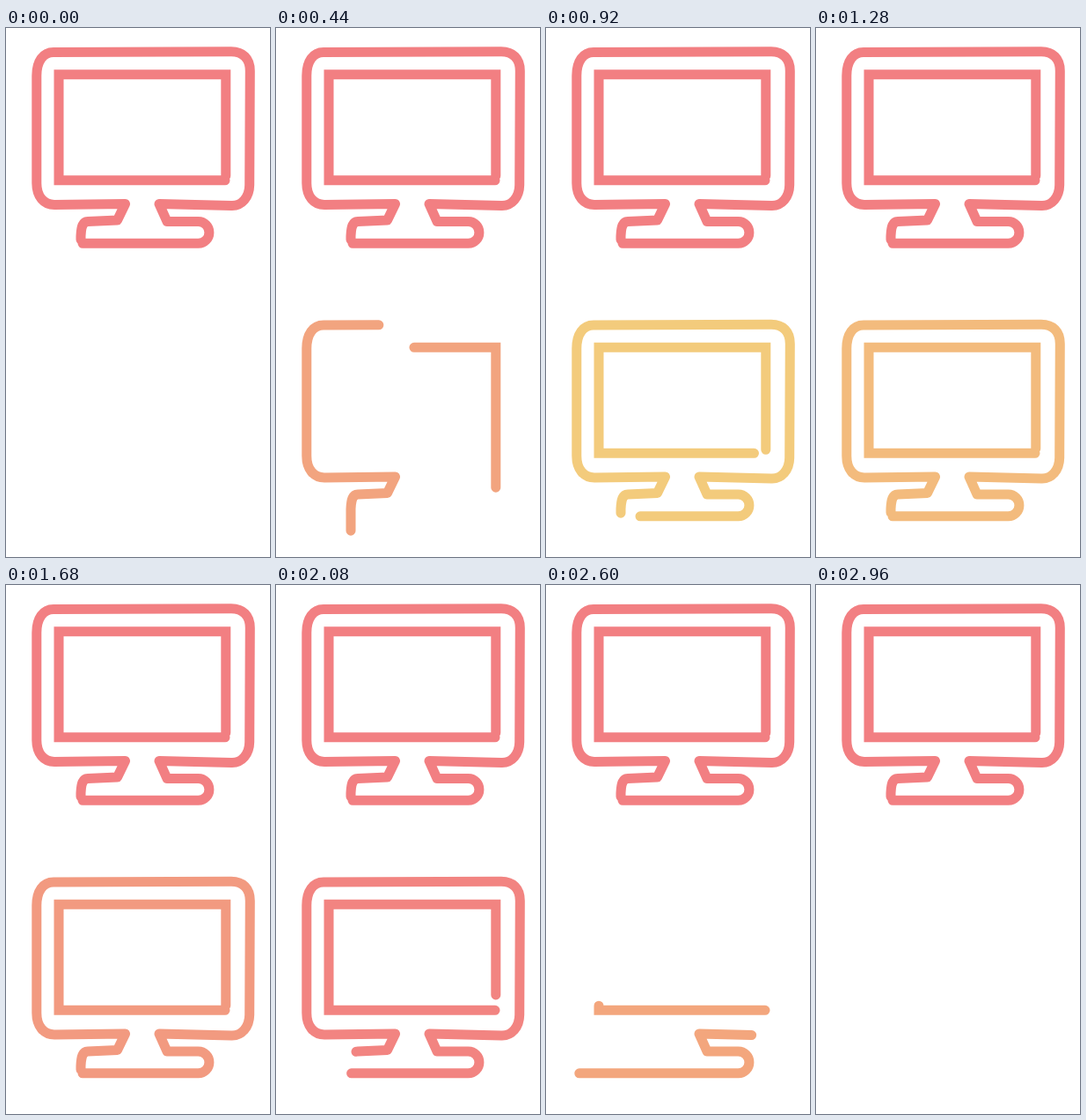
An HTML page for the animation above (3 s loop, 300 px wide and 600 px high).

```html
<!DOCTYPE html>
<html lang="en">
<head>
<meta charset="utf-8">
<title>Monitor line drawing</title>
<style>
  html, body { margin: 0; width: 100%; height: 100%; overflow: hidden; background: #fff; }
  svg { display: block; width: 300px; height: 600px; }
  path { fill: none; stroke-width: 11; stroke-linecap: round; }
  .case { stroke-linejoin: round; }
  .screen { stroke-linejoin: miter; }
</style>
</head>
<body>
<svg viewBox="0 0 300 600">
  <g id="still"></g>
  <g id="drawn" transform="translate(0 309.5)"></g>
</svg>
<script>
const LOOP = 3000, STEP = 40;
const RED = [242, 127, 130], YELLOW = [243, 210, 123], ORANGE = [244, 192, 121];

// lead: run-in before the outline starts; exit: run-out after it ends
const SHAPES = [
  {
    name: 'case', lead: 35, exit: 72,
    d: 'M85 275 V236 C85.5 225 87 219.8 93 219.5 L126.5 218 L135.5 199.5 L55 200.5 ' +
       'C43 200.5 34.8 191 34.8 176 V54 C34.8 38 42 27.5 54 27.5 L256 26.8 ' +
       'C269 27 277.4 34 277.3 49 L276.7 178 C276.5 192 268 201.5 257 201.5 ' +
       'L174 199.5 L183 219.5 H218.5 A12.4 12.4 0 0 1 218.5 244.3 H16'
  },
  {
    name: 'screen', lead: 75, exit: 0,
    d: 'M249.8 242.5 V52.8 H60 V172.8 H249'
  }
];

function addPaths(id) {
  const group = document.getElementById(id);
  return SHAPES.map(shape => {
    const el = document.createElementNS('http://www.w3.org/2000/svg', 'path');
    el.setAttribute('d', shape.d);
    el.setAttribute('class', shape.name);
    group.appendChild(el);
    return { el, lead: shape.lead, exit: shape.exit, length: el.getTotalLength() };
  });
}

const mix = (a, b, p) => a + (b - a) * p;

function ease(t, from, to) {
  const u = Math.min(1, Math.max(0, (t - from) / (to - from)));
  return u * u * (3 - 2 * u);
}

function trim(line, enter, leave) {
  const full = line.length - line.exit;
  const tail = mix(line.lead * enter, line.length, leave);
  const head = mix(full * enter, line.length, leave);
  const size = head - tail;
  line.el.style.visibility = size > 0.01 ? 'visible' : 'hidden';
  line.el.style.strokeDasharray = `${Math.max(size, 0)} 9999`;
  line.el.style.strokeDashoffset = -tail;
}

function colorAt(t) {
  const stops = [RED, YELLOW, RED, ORANGE];
  const i = Math.floor(t / 1000), p = t / 1000 - i;
  return `rgb(${stops[i].map((c, k) => Math.round(mix(c, stops[i + 1][k], p)))})`;
}

const still = addPaths('still');
const drawn = addPaths('drawn');

still.forEach(line => {
  line.el.style.stroke = `rgb(${RED})`;
  trim(line, 1, 0);
});

function render(now) {
  const t = Math.floor((now % LOOP) / STEP) * STEP;
  const enter = ease(t, 0, 1000), leave = ease(t, 2000, 2960);
  const color = colorAt(t);
  drawn.forEach(line => {
    line.el.style.stroke = color;
    trim(line, enter, leave);
  });
}

const start = performance.now();
function tick() {
  render(performance.now() - start);
  requestAnimationFrame(tick);
}
tick();
</script>
</body>
</html>
```
